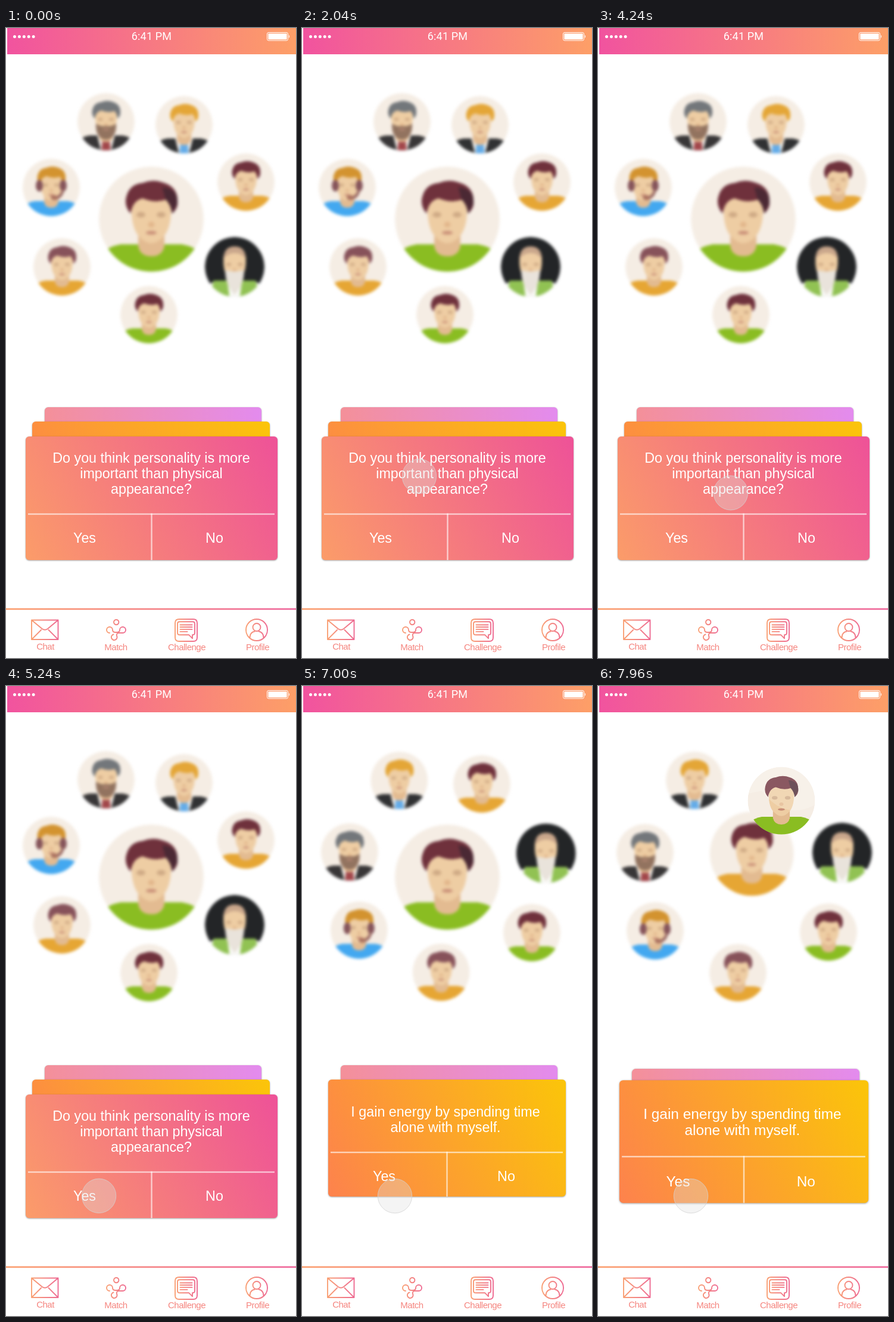
Animation of 487x1055 px, one loop 8000 ms. Source, as an HTML page:

```html
<!DOCTYPE html>
<html lang="en">
<head>
<meta charset="utf-8">
<title>Question cards</title>
<style>
  html, body { margin: 0; width: 100%; height: 100%; overflow: hidden; background: #fff; }
  svg { display: block; width: 100vw; height: 100vh; }
  .q { font: 23.3px "Liberation Sans", Arial, sans-serif; fill: #fff; text-anchor: middle; }
  .nav { font: 15px "Liberation Sans", Arial, sans-serif; letter-spacing: -.5px; fill: #f5857f; text-anchor: middle; }
  .clock { font: 18px Roboto, sans-serif; letter-spacing: .15px; fill: #fff; text-anchor: middle; }
  .icon { fill: none; stroke: url(#icon); stroke-width: 1.9; stroke-linejoin: round; stroke-linecap: round; }
  .rule { fill: #fff; opacity: .62; }
</style>
</head>
<body>
<svg viewBox="0 0 487 1055" preserveAspectRatio="none">
  <defs>
    <linearGradient id="bar"><stop stop-color="#f1539f"/><stop offset="1" stop-color="#fd9f67"/></linearGradient>
    <linearGradient id="line"><stop stop-color="#fb9f6e"/><stop offset="1" stop-color="#ee659b"/></linearGradient>
    <linearGradient id="icon"><stop stop-color="#f9a074"/><stop offset="1" stop-color="#ee6a92"/></linearGradient>
    <linearGradient id="rose" x1="0" y1="1" x2="1.176" y2=".706"><stop stop-color="#fb9c69"/><stop offset="1" stop-color="#ee5298"/></linearGradient>
    <linearGradient id="gold" x1="0" y1="1" x2="1.176" y2=".706"><stop stop-color="#fd824d"/><stop offset="1" stop-color="#fbc509"/></linearGradient>
    <linearGradient id="lilac"><stop stop-color="#f49099"/><stop offset="1" stop-color="#e38bee"/></linearGradient>
    <clipPath id="disc"><circle r="48"/></clipPath>
    <filter id="soft" x="-.2" y="-.2" width="1.4" height="1.4" color-interpolation-filters="sRGB"><feGaussianBlur stdDeviation="2.9"/></filter>
    <filter id="focus" x="-.2" y="-.2" width="1.4" height="1.4" color-interpolation-filters="sRGB"><feGaussianBlur id="focusBlur" stdDeviation="2.4"/></filter>
    <filter id="shadow" x="-.05" y="-.05" width="1.1" height="1.1" color-interpolation-filters="sRGB"><feDropShadow dx="0" dy=".8" stdDeviation="1.3" flood-color="#333" flood-opacity=".5"/></filter>
  </defs>
  <rect width="487" height="1055" fill="#fff"/>

  <rect x="2" width="485" height="44" fill="url(#bar)"/>
  <path d="M14.5 14.5h33" stroke="#fff" stroke-width="5" stroke-linecap="round" stroke-dasharray="0 7.9"/>
  <text class="clock" x="244.5" y="19.5">6:41 PM</text>
  <rect x="438.5" y="7.5" width="35" height="13.5" rx="2.5" fill="none" stroke="#fff"/>
  <rect x="440.3" y="9.3" width="31.4" height="9.9" rx="1" fill="#fff"/>
  <path d="M475 11.5q2.4 2.7 0 5.4z" fill="#fff"/>

  <g id="people"></g>
  <g id="cards"></g>
  <circle id="touch" r="28.7" fill="#e0e0e0" fill-opacity=".35" stroke="#d2d2d2" stroke-opacity=".75"/>

  <rect y="971.7" width="487" height="2.6" fill="url(#line)"/>
  <path class="icon" d="M43 991.5h44.5v32.5H43zl17.5 14.5q4.8 3.6 9.6 0L87.500 991.5M43 1024l16-16M87.500 1024l-16-16"/>
  <path class="icon" d="M181 995a4.200 4.200 0 1 0 8.400 0a4.200 4.200 0 1 0 -8.400 0M174 1013a5 5 0 1 1 5-5q0 4 5 4h2q5 0 5-4a5 5 0 1 1 5 5h-6q-5 0-4 5a4.800 4.800 0 1 1-5.500-2.500"/>
  <path class="icon" stroke-width="1.6" d="M290.500 990h24q6.500 0 6.500 6.500v24q0 6.500-6.500 6.500h-24q-6.500 0-6.500-6.500v-24q0-6.500 6.500-6.500zM291.500 994.200h22q3.500 0 3.500 3.500v15q0 3.500-3.500 3.500h-.5v6l-6-6h-15.500q-3.500 0-3.500-3.500v-15q0-3.500 3.500-3.500zM292.500 999.500h20M292.500 1003.300h20M292.500 1007.100h20M292.500 1010.900h12"/>
  <path class="icon" d="M403 1008a18 18 0 1 0 36 0a18 18 0 1 0-36 0M414.500 1003.500a6.500 6.500 0 1 0 13 0a6.500 6.500 0 1 0-13 0M409.500 1021.500q0-9.500 8-11M432.500 1021.500q0-9.500-8-11"/>
  <text class="nav" x="66" y="1040.500">Chat</text>
  <text class="nav" x="184.500" y="1042">Match</text>
  <text class="nav" x="303.500" y="1042">Challenge</text>
  <text class="nav" x="422.500" y="1042">Profile</text>
</svg>
<script>
const $ = id => document.getElementById(id);
const mix = (a, b, p) => a + (b - a) * p;
const span = (t, from, to) => Math.min(1, Math.max(0, (t - from) / (to - from)));
const ease = (t, from, to) => (1 - Math.cos(Math.PI * span(t, from, to))) / 2;
const mixPoint = (a, b, p) => [mix(a[0], b[0], p), mix(a[1], b[1], p)];
const bend = (a, c, b, p) => mixPoint(mixPoint(a, c, p), mixPoint(c, b, p), p);

// Portraits, drawn around 0,0 in a disc of radius 48
const shape = (d, fill) => `<path d="${d}" fill="${fill}"/>`;
const dot = (x, y, rx, ry, fill) => `<ellipse cx="${x}" cy="${y}" rx="${rx}" ry="${ry}" fill="${fill}"/>`;
const HAIR = 'M-19-5Q-25-12-23-20Q-20-32-8-33Q2-37 12-33Q24-29 24-17Q25-10 19-5Q19-13 14-18Q4-14-8-19Q-17-17-19-5z';
const BODY = 'M-50 34Q-40 25-28 23H28Q40 25 50 34V50H-50z';

function portrait({ hair, shirt, back = '#f5ede4', under = '', over = '' }) {
  return `<g clip-path="url(#disc)"><circle r="48" fill="${back}"/>` +
    shape(BODY, shirt) + under +
    shape('M-12 10H12V25Q10 34 0 34Q-10 34-12 25z', '#e3bb91') +
    shape('M-18-14Q-18-25 0-25Q18-25 18-14Q19 6 12 15Q6 22 0 22Q-6 22-12 15Q-19 6-18-14z', '#eecda3') +
    dot(-9.500, -4, 4, 2.500, '#cfaa85') + dot(9, -4, 4, 2.500, '#cfaa85') +
    dot(0, 5, 3, 2.500, '#e2b68b') + dot(0, 12.500, 5, 1.700, '#c98f77') +
    shape(HAIR, hair) + over + '</g>';
}

const suit = tie => shape('M-15 22H15L8 50H-8z', '#f5f1ec') + shape('M-6 29H6L8 50H-8z', tie);
const dark = '#6f313c', orange = '#e6a634', green = '#8abd22';
const looks = [
  { hair: '#73777b', shirt: '#383637', under: suit('#a2474b'),
    over: shape('M-17 3Q-8 9 0 7Q8 9 17 3Q18 28 0 30Q-18 28-17 3z', '#92735f') + dot(0, 13, 6, 1.500, '#b98a77') },
  { hair: '#e4a637', shirt: '#303133', under: suit('#65ace8') },
  { hair: dark, shirt: orange },
  { hair: '#33343500', shirt: '#fafaf7', back: '#232527',
    under: shape('M-34 22H-12L-8 50H-40zM34 22H12L8 50H40z', '#91c253'),
    over: shape('M-18-14Q-17-33 0-33Q17-33 18-14Q8-23 0-22Q-8-23-18-14z', '#c9a68b') +
      shape('M-15 5Q0 10 15 5Q16 28 0 45Q-16 28-15 5z', '#e9e3db') },
  { hair: dark, shirt: green },
  { hair: '#87525a', shirt: orange },
  { hair: '#d3932f', shirt: '#43a8f0',
    over: dot(-20, -3, 6, 10, '#85545a') + dot(20, -3, 6, 10, '#85545a') +
      shape('M22 3Q20 19 5 21V16Q15 15 18 3z', '#96645f') + dot(5, 17, 6, 4, '#a9705f') },
];

const start = [[168, 157], [299, 162], [403, 258], [384, 400], [240, 480], [94, 400], [76, 267]];
const end = [[79, 279], [162, 158], [301, 163], [410, 279], [387, 412], [235, 480], [96, 410]];
const hub = [244, 320], RISER = 2, SWINGER = 4, ELDER = 3;

const person = (id, filter, look, extra = '') =>
  `<g id="${id}"><g filter="url(#${filter})"><g id="${id}s">${portrait(look)}</g></g>${extra}</g>`;
$('people').innerHTML =
  looks.map((look, i) => person('p' + i, 'soft', look)).join('') +
  person('hub', 'focus', { hair: dark, shirt: green,
    over: shape('M10-29Q25-28 24-14L19-5Q18-13 13-18z', '#4b2934') +
      '<path id="gloss" d="M-48-50H50V5Q20 22-6 7Q-22-4-28-14L-48-10z" fill="#fff"/>' });

function place(id, [x, y], r) {
  $(id).setAttribute('transform', `translate(${x} ${y})`);
  $(id + 's').setAttribute('transform', `scale(${r / 48})`);
}

// Cards, drawn around their own centres
function card(id, w, h, fill, q) {
  let s = `<rect x="${-w / 2}" y="${-h / 2}" width="${w}" height="${h}" rx="6" fill="url(#${fill})" filter="url(#shadow)"/>`;
  if (q) {
    const label = (x, y, str) => `<text class="q" x="${x}" y="${y}">${str}</text>`;
    s += `<rect class="rule" x="${4 - w / 2}" y="${q.rule - 1.2}" width="${w - 9}" height="2.4"/>` +
      `<rect class="rule" x="-1.2" y="${q.rule - 1.2}" width="2.4" height="${h / 2 - q.rule + 1.2}"/>` +
      `<g id="${id}Text">` + q.lines.map((l, i) => label(q.x, q.y + 26 * i, l)).join('') +
      label(q.yes, q.answer, 'Yes') + label(q.no, q.answer, 'No') + '</g>';
  }
  return `<g id="${id}">${s}</g>`;
}
$('cards').innerHTML =
  card('third', 364, 179, 'lilac') +
  card('second', 399, 196, 'gold', { rule: 24, x: -2.5, y: -36, yes: -105.5, no: 99.5, answer: 72,
    lines: ['I gain energy by spending time', 'alone with myself.'] }) +
  card('first', 423, 207, 'rose', { rule: 26.5, x: -.5, y: -59.5, yes: -112.5, no: 105.5, answer: 74.5,
    lines: ['Do you think personality is more', 'important than physical', 'appearance?'] });

// Finger route: [from ms, to ms, x, y]
const touchStart = [234, 752];
const moves = [
  [1930, 2200, 130, 748], [2600, 3480, 394, 741.5],
  [3800, 4440, 174, 789], [4720, 5260, 156, 854],
];

function drawTouch(t) {
  let at = touchStart;
  for (const [from, to, x, y] of moves) at = mixPoint(at, [x, y], ease(t, from, to));
  $('touch').setAttribute('transform', `translate(${at[0]} ${at[1]})`);
  $('touch').setAttribute('opacity', span(t, 1400, 1900));
}

function drawPeople(t) {
  const turn = ease(t, 6400, 7040);
  const swing = 1 - (1 - span(t, 6400, 7040)) ** 1.8;
  const swap = ease(t, 7320, 8280);
  looks.forEach((_, i) => {
    let at = i === SWINGER ? bend(start[i], [314, 482], end[i], swing) : mixPoint(start[i], end[i], turn);
    let r = i === ELDER ? 50 : 48;
    if (i === RISER) {
      at = mixPoint(at, hub, swap);
      r = mix(48, 88, swap ** 2);
    }
    place('p' + i, at, r);
  });
  place('hub', bend(hub, [329, 214], end[RISER], swap), mix(88, 46, swap));
  $('focusBlur').setAttribute('stdDeviation', Math.max(.01, 2.4 * (1 - swap / .7)));
  $('gloss').setAttribute('opacity', .25 * swap);
}

function drawCards(t) {
  const out = ease(t, 6400, 6795);
  const grow = ease(t, 7320, 8280);
  const drop = ease(t, 7680, 8640);
  $('first').setAttribute('transform', `translate(${244.5 - 560 * out} 787.5) rotate(${-11 * out})`);
  $('first').setAttribute('visibility', out < 1 ? 'visible' : 'hidden');
  $('second').setAttribute('transform',
    `translate(${243.5 + 2 * grow} ${757 + 30.5 * drop}) scale(${1 + .064 * grow})`);
  $('third').setAttribute('transform',
    `translate(${247 + 1.3 * grow} ${724.5 + 14 * grow}) scale(${1 + .066 * grow})`);
  $('secondText').setAttribute('opacity', span(t, 6400, 6760));
}

function frame() {
  const t = Math.floor(performance.now() % 8000 / 40) * 40;
  drawTouch(t);
  drawPeople(t);
  drawCards(t);
  requestAnimationFrame(frame);
}
frame();
</script>
</body>
</html>
```
